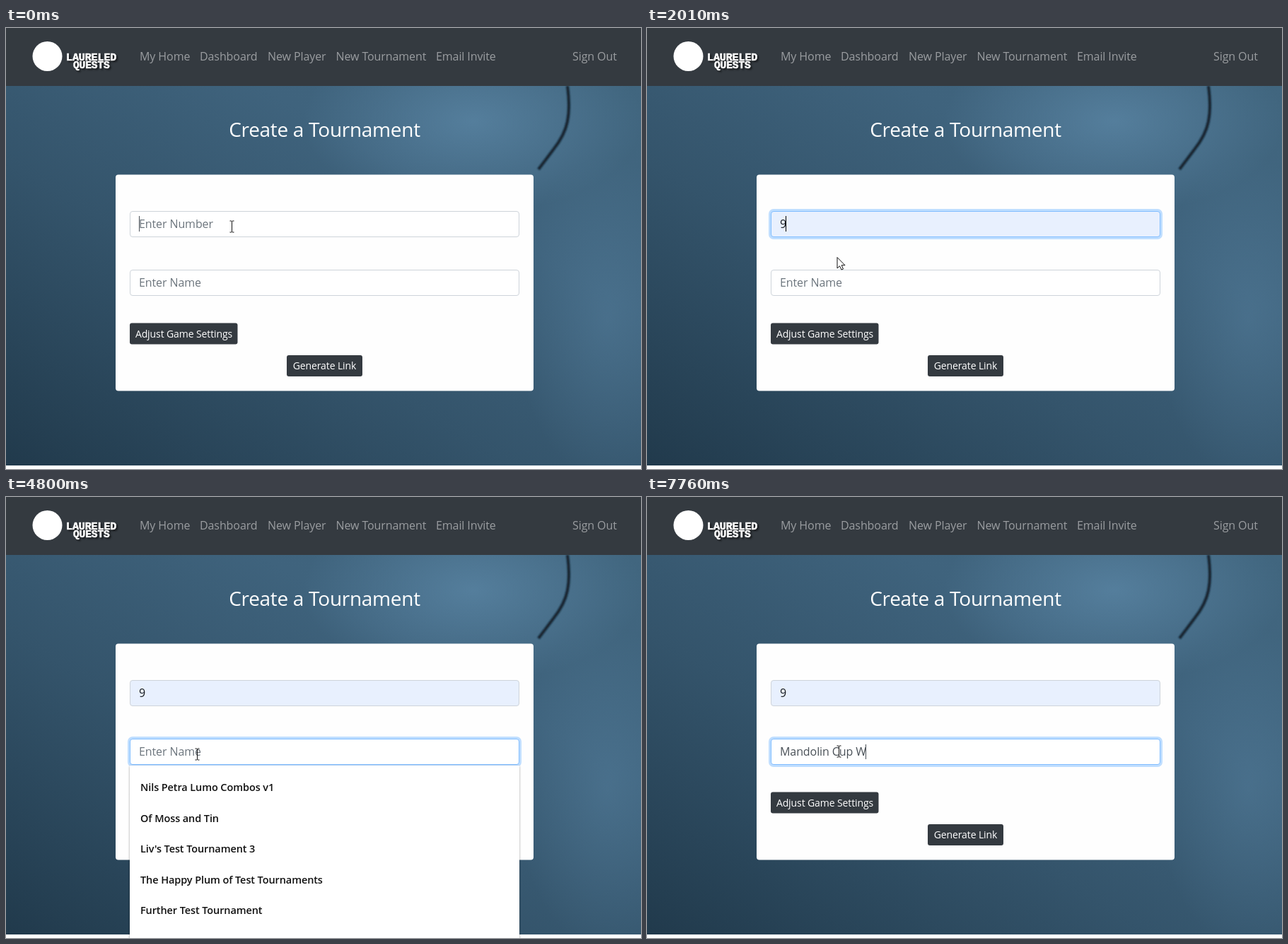
Write an HTML page that moves like this. It is 898 by 624 pixels and loops after 8 s.

```html
<!DOCTYPE html>
<html lang="en">
<head>
<meta charset="utf-8">
<title>Create a Tournament</title>
<style>
html, body { margin: 0; width: 100%; height: 100%; overflow: hidden; background: #fff; }
svg { display: block; font: 16px "Open Sans", sans-serif; letter-spacing: -.1px; }
text { white-space: pre; }
.nav { fill: #9a9da0; }
.brand { font: bold 15px "Liberation Mono", monospace; fill: #fff; stroke: #fff; stroke-width: .6; filter: drop-shadow(2px 2px 1px #0009); }
.title { font-size: 28px; letter-spacing: -.3px; fill: #fff; text-anchor: middle; }
.button { font-size: 14px; fill: #fff; text-anchor: middle; }
.list { fill: #fff; filter: drop-shadow(0 1px 1.5px #0006); }
.item { font-size: 14px; font-weight: 500; fill: #111; }
.wide { font-size: 14.5px; font-weight: 600; }
</style>
</head>
<body>
<svg width="898" height="624" viewBox="0 0 898 624">
  <defs>
    <linearGradient id="stone" x1="0" y1="1" x2="1" y2="0">
      <stop offset="0" stop-color="#213a4c"/>
      <stop offset=".4" stop-color="#34546b"/>
      <stop offset=".7" stop-color="#3f637d"/>
      <stop offset="1" stop-color="#41667f"/>
    </linearGradient>
    <radialGradient id="light">
      <stop offset="0" stop-color="#628fb0" stop-opacity=".6"/>
      <stop offset="1" stop-color="#628fb0" stop-opacity="0"/>
    </radialGradient>
    <filter id="soft"><feGaussianBlur stdDeviation="1.2"/></filter>
  </defs>
  <rect y="82" width="898" height="537" fill="url(#stone)"/>
  <svg y="82" width="898" height="537">
    <ellipse cx="660" cy="50" rx="240" ry="130" fill="url(#light)"/>
    <ellipse cx="850" cy="330" rx="130" ry="230" fill="url(#light)" opacity=".5"/>
    <path d="M794 0Q798 30 794 50T774 90L753 118" fill="none" stroke="#12222f" stroke-width="4" filter="url(#soft)"/>
  </svg>
  <rect width="898" height="82" fill="#343a40"/>
  <circle cx="58.500" cy="40" r="21" fill="#fff"/>
  <text class="brand" x="85" y="45.500">LAURELED</text>
  <text class="brand" x="95" y="56.500" style="font-size:14.500px">QUESTS</text>
  <g class="nav">
    <text x="189" y="46">My Home</text>
    <text x="274" y="46">Dashboard</text>
    <text x="370" y="46">New Player</text>
    <text x="466.500" y="46">New Tournament</text>
    <text x="608" y="46">Email Invite</text>
    <text x="801" y="46">Sign Out</text>
  </g>
  <text class="title" x="450.500" y="154">Create a Tournament</text>
  <rect x="155" y="207.500" width="591" height="306" rx="4" fill="#fefefe"/>
  <g fill="#343a40">
    <rect x="175" y="417.500" width="152.500" height="30" rx="3"/>
    <rect x="397" y="463" width="107" height="30" rx="3"/>
  </g>
  <text class="button" x="251.500" y="438">Adjust Game Settings</text>
  <text class="button" x="450.500" y="483">Generate Link</text>
  <g id="live"></g>
</svg>
<script>
const LOOP = 8000;
const live = document.getElementById('live');
const numbers = ['9', '8', '13'];
const names = [
  'Nils Petra Lumo Combos v1', 'Of Moss and Tin', "Liv's Test Tournament 3",
  'The Happy Plum of Test Tournaments', 'Further Test Tournament'
];
const typed = 'Mandolin Cup W';
const keyTimes = [4940, 5070, 5210, 5370, 5800, 5960, 6100, 6230, 6360, 6780, 6900, 7050, 7330, 7760];

// Each step overrides part of the state from its time on.
// focus1, focus2: strength of the focus ring; beam: text cursor instead of arrow
const steps = [
  [0, { number: '', preview: '', name: '', list: 0, row: -1, focus1: 0, focus2: 0, field: 1, caret: true, beam: true, x: 319, y: 281 }],
  [150, { focus1: 1, list: 1 }],
  [560, { caret: false }],
  [960, { beam: false, x: 291, y: 293 }],
  [1080, { x: 281, y: 317, row: 0, preview: '9', caret: true }],
  [1200, { x: 272, y: 339 }],
  [1320, { x: 268.5, y: 352, row: 1, preview: '8' }],
  [1600, { y: 324, row: 0, preview: '9', caret: false }],
  [2010, { list: 0, row: -1, preview: '', number: '9', caret: true }],
  [2150, { y: 331 }],
  [2280, { beam: true, x: 271, y: 357 }],
  [2400, { y: 364 }],
  [2540, { caret: false }],
  [2660, { x: 270 }],
  [3080, { field: 2, caret: true, focus1: .6, focus2: .15 }],
  [3200, { focus1: .25, focus2: .5, list: 2 }],
  [3350, { focus1: 0, focus2: 1 }],
  [3780, { caret: false }],
  [4220, { caret: true }],
  [4800, { caret: false }],
  [4940, { caret: true, list: 0 }],
  [5070, { x: 271, y: 360 }],
  ...keyTimes.map((time, i) => [time, { name: typed.slice(0, i + 1) }])
].sort((a, b) => a[0] - b[0]);

const mix = (a, b, k) => a.map((v, i) => Math.round(v + (b[i] - v) * k));

function field(y, focus, fill, value, hint, small) {
  const border = mix([206, 212, 218], [128, 189, 255], Math.min(1, focus * 1.6));
  const ring = 3 * focus;
  return `<rect x="${175 - ring}" y="${y - ring}" width="${551 + 2 * ring}" height="${37 + 2 * ring}" rx="${4 + ring}" fill="#007bff" opacity="${.25 * focus}"/>
    <rect x="175.5" y="${y + .5}" width="550" height="36" rx="3.5" fill="${fill}" stroke="rgb(${border})"/>
    <text class="value" x="188" y="${y + 24}" font-size="${small ? 13.33 : 16}"
      fill="${value ? (fill === '#fff' ? '#495057' : '#16191c') : '#6c757d'}">${value || hint}</text>`;
}

function list(items, top, bottom, row, wide) {
  const step = 43.6;
  const mark = row < 0 ? '' : `<rect x="175" y="${top + 9.5 + row * step}" width="550" height="${step}" fill="#c8c8c8"/>`;
  return `<path class="list" d="M175 ${top}H726V${bottom - 4}q0 4-4 4H179q-4 0-4-4z"/>${mark}` +
    items.map((s, i) => `<text class="item ${wide}" x="190" y="${top + 36 + i * step}">${s}</text>`).join('');
}

function pointer({ beam, x, y }) {
  const shape = beam
    ? '<path d="M-2.500-8H-.5L.5-7.500 1.500-8H3.500M.5-7.500V7.500M-2.500 8H-.5L.5 7.500 1.500 8H3.500" fill="none" stroke="#111"/>'
    : '<path d="M.5.5V16L4 12.800 6.500 18 9 17 6.700 11.700H11.500Z" fill="#fff" stroke="#111"/>';
  return `<g transform="translate(${x} ${y})">${shape}</g>`;
}

function draw(s) {
  const filled = s.number || s.preview;
  live.innerHTML =
    field(259, s.focus1, filled ? '#e8f0fe' : '#fff', filled, 'Enter Number', s.preview) +
    field(342, s.focus2, '#fff', s.name, 'Enter Name') +
    (s.list === 1 ? list(numbers, 296, 446.5, s.row, '') : '') +
    (s.list === 2 ? list(names, 380, 640, -1, 'wide') : '');

  if (s.caret) {
    const value = s.field === 1 ? s.number : s.name;
    const text = live.querySelectorAll('.value')[s.field - 1];
    const x = 188 + (value ? Math.round(text.getComputedTextLength() - 1) : 0);
    const [y, h] = s.field === 1 ? [266, 22] : [350, 21];
    const color = filled && s.field === 1 ? '#000' : '#495057';
    live.innerHTML += `<rect x="${x}" y="${y}" width="1" height="${h}" fill="${color}"/>`;
  }
  live.innerHTML += pointer(s);
}

let shown = -1;
function frame(now) {
  const t = now % LOOP;
  const past = steps.filter(([time]) => time <= t);
  if (past.length !== shown) {
    shown = past.length;
    draw(Object.assign({}, ...past.map(step => step[1])));
  }
  requestAnimationFrame(frame);
}
frame(0);
</script>
</body>
</html>
```
